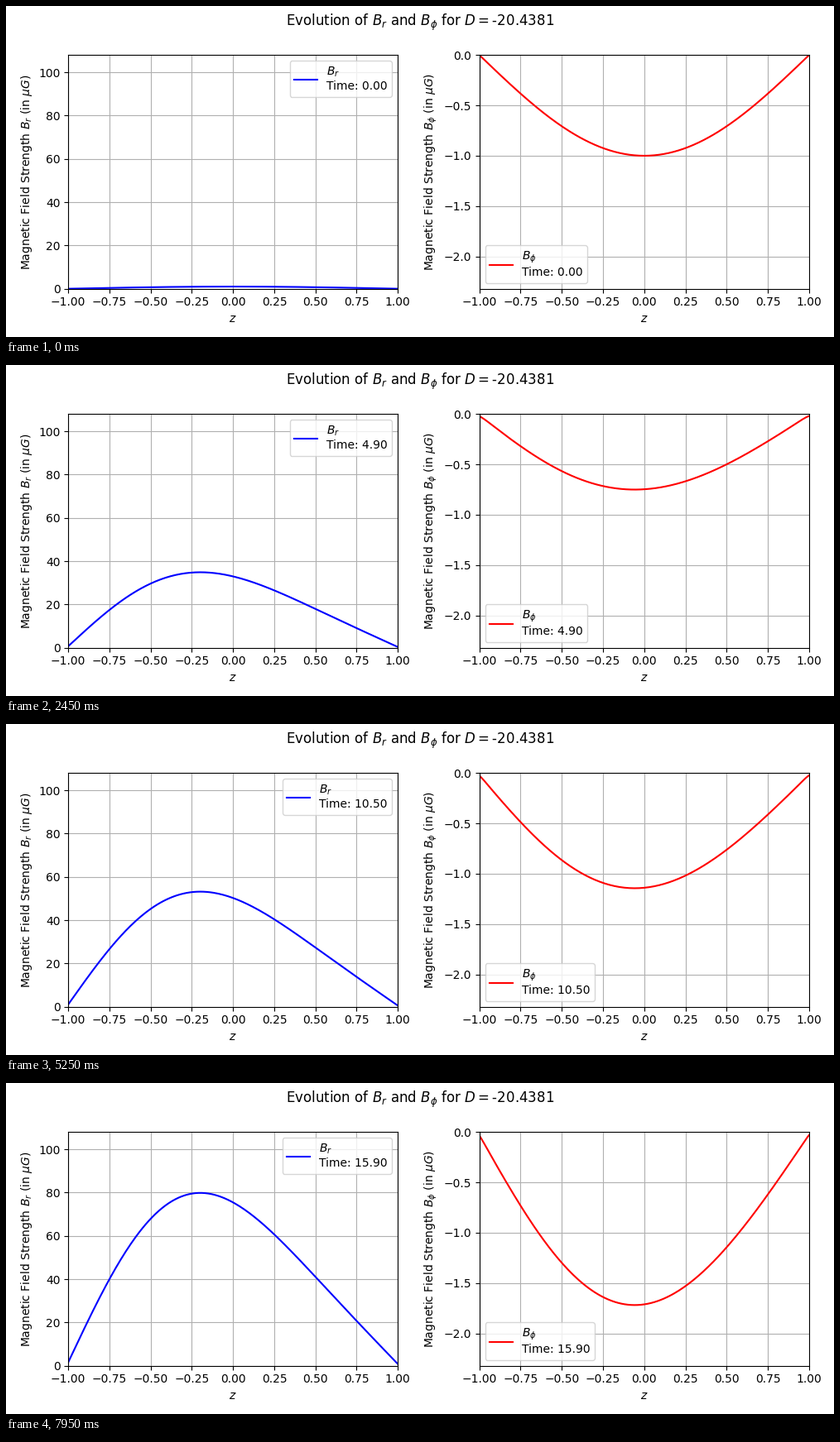
These frames come from a looping animation (1000 px wide and 400 px high, 8 s). A matplotlib script:

```python
import numpy as np
import matplotlib.pyplot as plt
from matplotlib.animation import FuncAnimation

FRAMES, INTERVAL = 160, 50
DT = 0.1
N = 201
SHEAR = 0.0562       # radial field -> azimuthal field
ALPHA_GRAD = 117.2   # azimuthal field -> radial field
ALPHA = 92.7         # azimuthal gradient -> radial field

z = np.linspace(-1, 1, N)
dz = z[1] - z[0]


def propagator():
    """Crank-Nicolson step matrix for the coupled field (B_r, B_phi)."""
    eye = np.eye(N)
    up, down = np.eye(N, k=1), np.eye(N, k=-1)
    diffusion = (up - 2 * eye + down) / dz**2
    slope = (up - down) / (2 * dz)
    alpha = ALPHA * np.cos(np.pi * z / 2)[:, None]
    rate = np.block([
        [diffusion, -ALPHA_GRAD * eye - alpha * slope],
        [-SHEAR * eye, diffusion],
    ])
    unit = np.eye(2 * N)
    return np.linalg.solve(unit - DT / 2 * rate, unit + DT / 2 * rate)


def evolve():
    step = propagator()
    start = np.cos(np.pi * z / 2)
    states = [np.concatenate([start, -start])]
    for _ in range(FRAMES - 1):
        states.append(step @ states[-1])
    return states


def make_panel(rect, symbol, color, ylim, loc):
    ax = fig.add_axes(rect)
    line, = ax.plot(z, 0 * z, color=color, label=f"${symbol}$\nTime: 0.00")
    ax.set(xlim=(-1, 1), ylim=ylim, xlabel="$z$",
           ylabel=rf"Magnetic Field Strength ${symbol}$ (in $\mu G$)")
    ax.grid(True)
    text = ax.legend(loc=loc).get_texts()[0]
    return line, text, symbol


states = evolve()

fig = plt.figure(figsize=(10, 4), dpi=100)
fig.suptitle(r"Evolution of $B_r$ and $B_\phi$ for $D = $-20.4381")

BOTTOM, HEIGHT = 0.1458, 0.7062
panels = [
    make_panel([0.0752, BOTTOM, 0.3980, HEIGHT], "B_r", "blue",
               (0, 108.0), "upper right"),
    make_panel([0.5716, BOTTOM, 0.3984, HEIGHT], r"B_\phi", "red",
               (-2.32, 0), "lower left"),
]


def update(i):
    artists = []
    for (line, text, symbol), field in zip(panels, np.split(states[i], 2)):
        line.set_ydata(field)
        text.set_text(f"${symbol}$\nTime: {i * DT:.2f}")
        artists += [line, text]
    return artists


anim = FuncAnimation(fig, update, frames=FRAMES, interval=INTERVAL,
                     init_func=lambda: update(0), repeat=True, repeat_delay=0)
plt.show()
```
